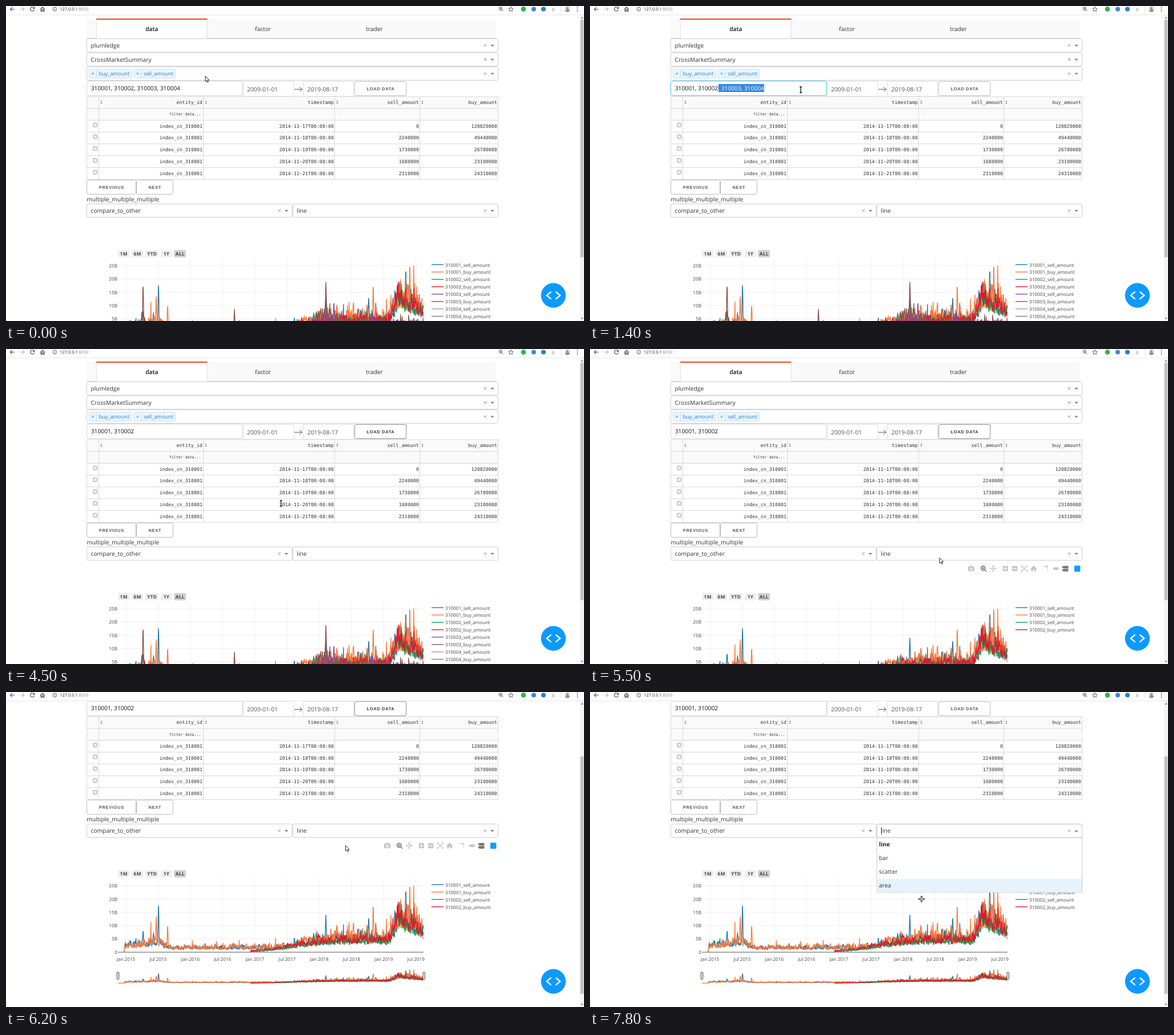
Write an HTML page that moves like this. It is 1012 px wide and 553 px high and loops after 8 s.

```html
<!DOCTYPE html>
<html lang="en">
<head>
<meta charset="utf-8">
<title>Data dashboard</title>
<style>
  html, body { margin: 0; width: 100%; height: 100%; overflow: hidden; background: #fff; }
  svg { display: block; }
  text { font: 10.25px "Open Sans", sans-serif; fill: #333; white-space: pre; text-rendering: geometricPrecision; }
  .mono { font: 8.35px "DejaVu Sans Mono", monospace; text-anchor: end; }
  .small { font-size: 8.2px; fill: #444; }
  .chip { font-size: 9.18px; fill: #1683e0; }
  .button { font: bold 7.48px "Liberation Sans", sans-serif; letter-spacing: .68px; fill: #555; text-anchor: middle; }
  .range { font-weight: 700; font-size: 8.2px; letter-spacing: .4px; fill: #444; text-anchor: middle; }
  .mid { text-anchor: middle; }
  .date { font-size: 10.35px; fill: #555; }
  .active rect { stroke: #888; }
  .active text { fill: #333; }
</style>
</head>
<body>
<svg id="stage" width="1012" height="553" viewBox="0 0 1012 553"></svg>
<script>
const text = (x, y, s, cls = '', extra = '') => `<text x="${x}" y="${y}" class="${cls}" ${extra}>${s}</text>`;
const rect = (x, y, w, h, fill = '#fff', stroke = 'none', r = 0, extra = '') =>
  `<rect x="${x}" y="${y}" width="${w}" height="${h}" rx="${r}" fill="${fill}" stroke="${stroke}" ${extra}/>`;
const path = (d, stroke, width = 1, fill = 'none', extra = '') =>
  `<path d="${d}" stroke="${stroke}" stroke-width="${width}" fill="${fill}" ${extra}/>`;
const circle = (x, y, r, fill, extra = '') => `<circle cx="${x}" cy="${y}" r="${r}" fill="${fill}" ${extra}/>`;
const group = (id, body) => `<g id="${id}">${body}</g>`;
const range = n => [...Array(n).keys()];

// ---- form controls ----
const cross = (x, y, c = '#888', r = 2.2) =>
  path(`M${x - r} ${y - r}l${2 * r} ${2 * r}m0 ${-2 * r}l${-2 * r} ${2 * r}`, c, .9);
const caretDown = (x, y) => path(`M${x - 3.5} ${y - 1.5}h7l-3.5 3.6z`, 'none', 0, '#888');
const select = (x, y, w, label) => rect(x + .5, y + .5, w - 1, 23.5, '#fff', '#ccc', 2.7) +
  text(x + 7.5, y + 16.2, label) + cross(x + w - 23, y + 12.3) + caretDown(x + w - 10.5, y + 12.5);
const chip = (x, w, label) => rect(x, 111, w, 15.5, '#ebf5ff', '#c2e0ff', 1.5) +
  path(`M${x + 13} 111v15.5`, '#c2e0ff') + cross(x + 6.5, 118.7, '#1683e0', 1.7) + text(x + 17, 122.3, label, 'chip');
const button = (x, y, w, label) => rect(x + .5, y + .5, w - 1, 25, '#fff', '#bbb', 2.7) +
  text(x + w / 2 + .3, y + 15.7, label, 'button');

function tabs() {
  const label = (x, s, extra) => text(x, 44, s, 'mid', extra);
  return rect(141, 23, 717, 34, '#f9f9f9', 'none', 2.7) + path('M141 56.5H858', '#d6d6d6', .8) +
    rect(158, 22, 194, 36) + path('M158.3 23V57M352 23V57', '#d6d6d6', .8) + rect(158, 22, 194.5, 2.2, '#e8552d') +
    label(255.3, 'data', 'style="font-weight:600;fill:#111"') + label(450, 'factor') + label(645, 'trader');
}

function form() {
  return select(141, 57, 721, 'plumledge') + select(141, 81.7, 721, 'CrossMarketSummary') +
    select(141, 106.4, 721, '') + chip(145.5, 74, 'buy_amount') + chip(224, 72.5, 'sell_amount') +
    rect(141.5, 131.8, 272.5, 25.5, '#fff', '', 2.7, 'id="input"') +
    text(148.7, 148, '', '', 'id="codes" style="fill:#111"') +
    `<svg id="selection" x="224.5" y="137" width="0" height="14">${rect(0, 0, 81, 14, '#3589dc')}` +
      text(-75.8, 11, '310001, 310002, 310003, 310004', '', 'style="fill:#fff"') + '</svg>' +
    rect(415.5, 132.5, 88.5, 26, '#fff', '#ddd') + rect(520.5, 132.5, 88, 26, '#fff', '#ddd') +
    text(422, 150, '2009-01-01', 'date') + text(527.5, 150, '2019-08-17', 'date') +
    path('M505 146.2h13.5m-4.5-4l4.5 4l-4.5 4', '#555') + group('load', button(610, 132, 91.3, 'LOAD DATA'));
}

function table() {
  const columns = [162.5, 345.5, 575.5, 724.5, 861.5], rowY = i => 200.5 + 20.75 * i;
  const days = [[0, 120820000], [2240000, 49440000], [1730000, 26700000], [1680000, 23100000], [2310000, 24310000]];
  let s = rect(141.5, 159.5, 720, 41, '#fafafa');
  range(8).forEach(i => s += path(`M141 ${rowY(i - 2)}H862`, '#d3d3d3', .9));
  [141.5, ...columns].forEach(x => s += path(`M${x} 159V304.5`, '#d3d3d3', .9));
  ['entity_id', 'timestamp', 'sell_amount', 'buy_amount'].forEach((name, i) => {
    const x = columns[i] + 4.5;
    s += text(columns[i + 1] - 1.7, 172.2, name, 'mono') +
      path(`M${x - 2} 168.3l2-2.6 2 2.6zM${x - 2} 169.7l2 2.6 2-2.6z`, 'none', 0, '#999');
  });
  s += text(341.5, 192.3, 'filter data...', 'mono', 'style="font-size:6.6px"');
  days.forEach(([sell, buy], i) => {
    const y = rowY(i) + 13;
    ['index_cn_310001', `2014-11-${17 + i}T00:00:00`, sell, buy].forEach((v, k) =>
      s += text(columns[k + 1] - 1.5, y, v, 'mono'));
    s += rect(152.8, y - 8, 6.6, 6.6, '#eee', '#999', 1.2, 'stroke-width=".9"');
  });
  return s + button(141, 305, 87, 'PREVIOUS') + button(228, 305, 65, 'NEXT') +
    text(141.3, 343, 'multiple_multiple_multiple') +
    select(141, 347, 360.5, 'compare_to_other') + select(501.8, 347, 360.2, 'line');
}

function modebar() {
  const c = '#c4c4c4', dark = '#777', y = 385.5;
  const box = (x, sign) => rect(x - 4.5, y - 4.5, 9, 9, c, 'none', 1) + path(`M${x - 3} ${y}h6${sign}`, '#fff', 1.5);
  const tag = (x, y, w, color) => path(`M${x} ${y}l3-2.3h${w}v4.6h${-w}z`, 'none', 0, color);
  return rect(662, 382, 11, 8, c, 'none', 1.2) + rect(665, 380.5, 5, 3, c) +
    circle(667.5, 386, 2, c, 'stroke="#fff" stroke-width="1.2"') +
    circle(688.3, 384.8, 3.6, 'none', `stroke="${dark}" stroke-width="1.7"`) +
    path('M691 387.5l3.3 3.3M686.5 384.8h3.6m-1.8-1.8v3.6', dark, 1.4) +
    path('M701 385.5h10m-5-5v10', c, 1.2) +
    range(4).map(i => path('M-1.8 -3.3L0-5 1.8-3.3', c, 1.2, 'none', `transform="translate(706 ${y}) rotate(${90 * i})"`)).join('') +
    box(727.3, 'm-3-3v6') + box(743.8, '') +
    range(4).map(i => path('M-4.8-2.5v-2.3h2.3M0 0L-3.3-3.3', c, 1.3, 'none', `transform="translate(760.3 ${y}) rotate(${90 * i})"`)).join('') +
    path('M771 386l5.7-5.5 5.7 5.5h-1.6v4.3h-2.8v-3h-2.6v3h-2.8v-4.3z', 'none', 0, c) +
    path('M793.5 381.5h7.5v9', c, 1.3, 'none', 'stroke-dasharray="2 1.2"') + circle(800, 382, 1.4, c) +
    tag(810, 385.5, 7.5, c) + tag(826, 383, 8.5, dark) + tag(826, 388.3, 8.5, dark) +
    rect(848, 380.3, 10.4, 10.6, '#119dff');
}

// ---- chart ----
const yearWidth = 112.84, yearX = 210;
const colors = ['#1f77b4', '#ff7733', '#0a9f4a', '#e2162e', '#8e44a8', '#8c5449', '#c985b4', '#7f7f7f'];

function random(seed) {
  return () => {
    seed = seed + 0x6D2B79F5 | 0;
    let t = Math.imul(seed ^ seed >>> 15, 1 | seed);
    t = t + Math.imul(t ^ t >>> 7, 61 | t) ^ t;
    return ((t ^ t >>> 14) >>> 0) / 4294967296;
  };
}

// Volume levels in billions, by years since 2015.
const bell = (u, center, width) => Math.exp(-(((u - center) / width) ** 2));
const rise = (u, center, width) => 1 / (1 + Math.exp((center - u) / width));
const rally = u => u < 4.24 ? bell(u, 4.24, .085) : Math.exp((4.24 - u) / .36);
const shanghai = u => 1.7 + 1.2 * bell(u, .1, .25) + 2.4 * bell(u, .46, .13) + 3.6 * rise(u, 2.8, .17) + 9.5 * rally(u);
const shenzhen = u => 4.4 * rise(u, 2.6, .24) + 9.5 * rally(u);
const northern = u => 1.8 + 3.5 * bell(u, .27, .05) + 1.4 * rise(u, 2.8, .15) + 5 * bell(u, 3.1, .12);

// Daily values: correlated noise around a level, with random and given [x, value] peaks.
function series(seed, start, jitter, level, peaks = []) {
  const rnd = random(seed), points = [[start, 0]];
  let drift = 0;
  for (let x = start + 1; x <= 731; x += .467) {
    drift = .5 * drift + rnd() - .5;
    let v = level((x - yearX) / yearWidth) * Math.exp(jitter * drift);
    if (rnd() < .045) v *= 1 + jitter * rnd();
    for (const [px, pv] of peaks) v += (pv - v) * Math.max(0, 1 - Math.abs(x - px) / 1.3);
    points.push([x, Math.min(v, 25)]);
  }
  return points;
}

const traces = [
  series(11, 207, .75, shanghai, [[240, 9], [267, 19.5], [560, 15], [635, 14], [700, 25.5]]),
  series(27, 207, .85, shanghai, [[263, 14], [283, 11], [643, 19], [707, 27]]),
  series(35, 428, .5, u => .93 * shenzhen(u)),
  series(42, 428, .55, u => 1.03 * shenzhen(u) + .3),
  series(58, 428, .7, u => .6 + 2.4 * rise(u, 2.7, .15) + 1.8 * bell(u, 3.15, .15), [[574, 12]]),
  series(63, 207, .8, northern, [[240, 19.5], [400, 9], [560, 19.5]]),
  series(71, 428, .6, u => .4 + 2 * rise(u, 2.8, .2)),
  series(86, 428, .6, u => .4 + 2 * rise(u, 2.8, .2))
];

const trace = (i, base, scale) => path('M' + traces[i].map(([x, v]) =>
  `${x.toFixed(1)} ${(base - v * scale).toFixed(1)}`).join('L'), colors[i], 1.36, 'none', 'stroke-linejoin="round"');

const plotTraces = indexes => indexes.map(i => {
  const y = 454 + i * 12.95, name = `31000${(i >> 1) + 1}_${i % 2 ? 'buy' : 'sell'}_amount`;
  return trace(i, 572.5, 4.66) + path(`M745 ${y}h21`, colors[i], 1.4) + text(769, y + 3.5, name, 'small');
}).join('');

function chart() {
  let s = '';
  [['1M', 196, 20], ['6M', 220, 20], ['YTD', 244, 23], ['1Y', 271, 19.5], ['ALL', 294, 21]].forEach(([name, x, w]) =>
    s += rect(x, 428.5, w, 12.7, name === 'ALL' ? '#d0d0d0' : '#eee', 'none', 2) + text(x + w / 2 + .2, 437.8, name, 'range'));
  for (const i of range(10)) {
    const x = yearX + yearWidth / 2 * i;
    s += path(`M${x} 444V572.5`, '#eee', .9) + text(x, 588, `${i % 2 ? 'Jul' : 'Jan'} ${2015 + (i >> 1)}`, 'small mid');
  }
  for (const i of range(6)) {
    const y = 572.5 - 23.3 * i;
    s += path(`M196 ${y}H731`, i ? '#eee' : '#444', .9) + text(195, y + 3, i ? 5 * i + 'B' : 0, 'small', 'text-anchor="end"');
  }
  s += plotTraces([0, 1, 2, 3]) + group('extra', plotTraces([4, 5, 6, 7]));
  s += path('M196 626.8H207.5', colors[1], 1.3) + range(4).map(i => trace(i, 627, .95)).join('');
  return s + [196, 731.8].map(x => rect(x - 1.6, 607.5, 3.2, 13, '#fff', '#333', 1.2)).join('');
}

function dropdown() {
  return rect(502.3, 347.5, 359.2, 23.8, 'none', '#ccc', 2.7) + rect(845, 353, 14, 12) +
    path('M848 361.3h7l-3.5-3.6z', 'none', 0, '#888') + path('M510.3 353.3v12.5', '#111') +
    rect(502.3, 371.5, 359.2, 96, '#fff', '#ccc') + rect(502.8, 0, 358.2, 23.6, '#e6f2fc', 'none', 0, 'id="highlight"') +
    ['line', 'bar', 'scatter', 'area'].map((s, i) =>
      text(506, 387.2 + 24 * i, s, '', i ? '' : 'style="font-weight:700;fill:#222"')).join('');
}

// ---- fixed browser parts ----
function browser() {
  const ink = '#555', arrow = 'M4 0H-3.5m3.3-3.3L-3.5 0l3.3 3.3';
  return rect(0, 0, 1012, 16) + path('M0 15.7H1012', '#ddd', .8) +
    path(arrow, ink, 1.2, 'none', 'transform="translate(11 5.5)"') +
    path(arrow, '#bbb', 1.2, 'none', 'transform="translate(28.5 5.5) scale(-1 1)"') +
    path('M49.2 3.8a3.5 3.5 0 1 0 .3 2.6M49.8 1.5v2.9h-2.9', ink, 1.2) +
    path('M60 6l4-3.8L68 6M61.2 5.3v4h1.8v-2.7h2v2.7h1.8v-4', ink, 1.2) +
    circle(85.5, 5.5, 3.4, 'none', `stroke="${ink}" stroke-width=".9"`) + path('M85.5 5v2.6m0-4.3v.9', ink) +
    text(94.3, 8.3, '127.0.0.1<tspan fill="#888">:8050</tspan>', '', 'style="font-size:7.4px;fill:#222"') +
    circle(866, 4.7, 2.7, 'none', `stroke="${ink}"`) + path('M868 6.7l2.5 2.6M864.8 4.7h2.4m-1.2-1.2v2.4', ink, .9) +
    path('M884 1.5l1.2 2.8 3 .2-2.3 2 .7 3-2.6-1.6-2.6 1.6.7-3-2.3-2 3-.2z', ink, .9) +
    circle(906, 5.5, 4.4, '#34b253') + circle(924, 5.5, 4, '#3d86d6') + circle(941, 5.5, 4, '#2c7fc0') +
    path('M955.5 8.5h5M956.3 6.5l1.7-3.5 1.7 3.5z', '#aaa', .9) + path('M972 0v11', '#ddd') +
    circle(983, 5.5, 5, '#e4ddd5') + circle(983, 4, 2, '#a58d7b') + path('M979 8.8a4 3 0 0 1 8 0a5 5 0 0 1-8 0z', 'none', 0, '#a58d7b') +
    range(3).map(i => circle(1000.5, 2 + 3.5 * i, .9, ink)).join('') +
    rect(1005, 16, 7, 537, '#f3f3f3') + rect(1005.7, 24, 5.6, 417, '#c1c1c1', 'none', 0, 'id="thumb"') +
    path('M1006.6 21.7l2-2.4 2 2.4zM1006.6 547.5l2 2.4 2-2.4z', 'none', 0, '#666') +
    circle(958.4, 508, 21.7, '#0c9aff') +
    path('M954.5 501.5l-7.7 6.5 7.7 6.5M962.5 501.5l7.7 6.5-7.7 6.5', '#fff', 2.3);
}

const beam = 'M-2 -5h1.4l.6.6.6-.6H2M0-4.5v9M-2 5h1.4l.6-.6.6.6H2';
const pointers = {
  arrow: path('M0 0V9.6L2.3 7.6 3.9 11 5.4 10.3 3.9 7.1H6.7z', '#111', .9, '#fff'),
  beam: path(beam, '#fff', 2.4) + path(beam, '#111', 1.3),
  hand: path('M0 .8Q.8-.3 1.6.8V4.5L6.8 5.5Q7.6 6 7.3 8L6.5 11.5H1L-2.5 7Q-2.5 5.7-1.3 6.2L0 7.3z', '#111', .9, '#fff'),
  plus: path('M-1-5H1V-1H5V1H1V5H-1V1H-5V-1H-1z', '#111', .9, '#fff')
};

document.getElementById('stage').innerHTML =
  group('page', tabs() + form() + table() + group('modebar', modebar()) +
    rect(576, 398, 103, 17, '#69738a', 'none', 1.5, 'id="tip" opacity=".03"') + chart() + group('dropdown', dropdown())) +
  browser() + group('pointer', Object.keys(pointers).map(k => group(k, pointers[k])).join(''));

// ---- motion, sampled every 100 ms ----
// Pointer destinations: arrival time, x, y and, for a glide, how long it takes.
const moves = [
  [0, 349, 123], [1000, 225, 145, 900], [1400, 369, 147, 300], [2500, 631, 145, 500], [4500, 481.5, 271],
  [5300, 630, 391], [5500, 612, 366.5], [5800, 658.5, 382], [6200, 594.5, 269.5], [6500, 590, 262],
  [6800, 589, 243], [7100, 584, 313], [7800, 580.5, 363.5]
];

function pointerAt(t) {
  let [, x, y] = moves[0];
  for (const [end, toX, toY, duration = 100] of moves) {
    const p = Math.min(1, Math.max(0, 1 - (end - t) / duration)), eased = p * p * (3 - 2 * p);
    x += (toX - x) * eased;
    y += (toY - y) * eased;
  }
  return [x, y];
}

function pointerKind(t, x, y) {
  if (t >= 7800) return 'plus';
  if (t >= 7100 || t < 4500 && x > 610) return 'hand';
  return t < 5300 && y >= 132 ? 'beam' : 'arrow';
}

const el = id => document.getElementById(id);
const set = (id, name, value) => el(id).setAttribute(name, value);
const show = (id, on) => set(id, 'display', on ? 'inline' : 'none');

function draw(now) {
  const t = Math.floor(now % 8000 / 100) * 100, during = (from, to) => t >= from && t < to;
  const [x, y] = pointerAt(t), kind = pointerKind(t, x, y);
  const scroll = t < 5800 ? 0 : t < 6200 ? 8.2 : 115.7;
  set('page', 'transform', `translate(0 ${-scroll})`);
  set('thumb', 'y', 24 + scroll * .77);
  set('pointer', 'transform', `translate(${x} ${y})`);
  Object.keys(pointers).forEach(k => show(k, k === kind));
  show('modebar', during(5300, 6800));
  set('modebar', 'opacity', during(5300, 5500) ? .5 : during(5800, 6200) ? .04 : 1);
  show('tip', during(5800, 6200));
  set('input', 'stroke', during(1200, 4500) ? '#33c3f0' : '#d1d1d1');
  el('codes').textContent = '310001, 310002' + (t < 2100 ? ', 310003, 310004' : '');
  set('selection', 'width', during(1200, 2100) ? Math.min(80.5, Math.max(0, x - 224.5)) : 0);
  set('load', 'class', during(2500, 7100) ? 'active' : '');
  show('extra', t < 4800);
  show('dropdown', t >= 7100);
  set('highlight', 'y', t < 7800 ? 419.7 : 443.6);
  requestAnimationFrame(draw);
}
draw(0);
</script>
</body>
</html>
```
